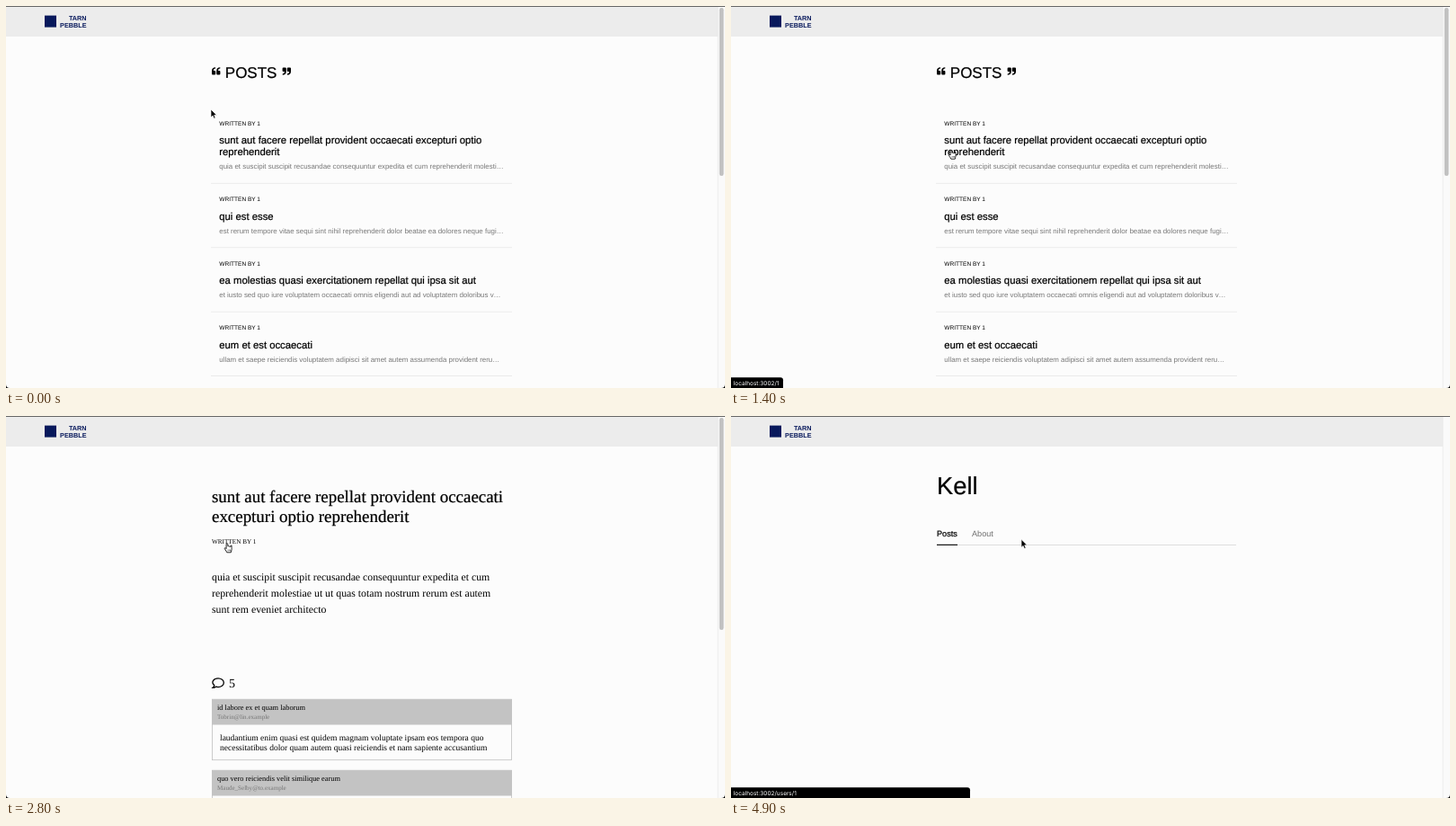
An HTML page for the animation above (5 s loop, 800x425 px).

```html
<!DOCTYPE html>
<html lang="en">
<head>
<meta charset="utf-8">
<title>Posts</title>
<style>
html, body { margin: 0; width: 100%; height: 100%; overflow: hidden; background: #fcfcfc; }
svg { display: block; width: 100%; height: 100%; }
text { text-rendering: geometricPrecision; white-space: pre; }
.sans { font-family: "Liberation Sans", Arial, sans-serif; }
.serif { font-family: "Liberation Serif", "Times New Roman", serif; }
.ui { font-family: Inter, sans-serif; }
.strong { stroke: #000; stroke-width: .22px; }
</style>
</head>
<body>
<svg id="stage" viewBox="0 0 800 425"></svg>
<script>
const text = (x, y, size, str, fill = '#000', extra = '') =>
  `<text x="${x}" y="${y}" font-size="${size}" fill="${fill}" ${extra}>${str}</text>`;
const rect = (x, y, w, h, fill, extra = '') =>
  `<rect x="${x}" y="${y}" width="${w}" height="${h}" fill="${fill}" ${extra}/>`;
const group = (id, body, cls = 'sans') => `<g id="${id}" class="${cls}">${body}</g>`;
const strong = 'class="strong"';

// Brand block, 112 x 27 units
const brand = (x, y, scale) => `<g class="sans" font-weight="700" text-anchor="end"
  transform="translate(${x} ${y}) scale(${scale})">
  ${rect(19, 0, 26, 26, '#08195c')}
  ${text(112, 11.6, 14.5, 'TARN', '#08195c')}${text(112, 26, 14.5, 'PEBBLE', '#08195c')}</g>`;

const byline = (id, x, y, size, width) => `<g id="${id}">
  ${text(x, y, size, 'WRITTEN BY 1')}
  ${rect(x, y + .7, width, .6, '#777', 'class="line"')}</g>`;

const quote = (x, y, turn) => {
  const drop = 'M4.1 .2V1.6C2.4 1.8 1.9 2.7 1.9 4H3.2Q4.2 4 4.2 5V7.6Q4.2 8.6 3.2 8.6H1Q0 8.6 0 7.6V4.2C0 1.8 1.5 .2 4.1 .2Z';
  return `<g transform="translate(${x} ${y}) rotate(${turn})">
    <path d="${drop}"/><path d="${drop}" transform="translate(5.2 0)"/></g>`;
};

const post = (y, titles, excerpt, id) => {
  const last = y + 20.3 + (titles.length - 1) * 13.3;
  return byline(id, 237.3, y, 6.55, 45.5) +
    titles.map((s, i) => text(237.3, y + 20.3 + i * 13.3, 11.3, s, '#000', strong)).join('') +
    text(237.3, last + 15, 7.9, excerpt, '#777') +
    rect(228, last + 30.7, 335, .8, '#e8e8e8');
};

const icons = [
  '<circle cx="4" cy="2.6" r="2"/><path d="M.6 8C.6 4.4 7.4 4.4 7.4 8Z"/>',
  '<rect x=".5" y="1.2" width="7.4" height="5.8" rx=".8"/><path d="M.6 2.4L4.2 5 7.8 2.4"/>',
  '<path d="M5.5.8L7.6 1.3C7.6 5 5 7.7 1.1 7.8L.6 5.8 2.5 5 3.4 6C4.5 5.5 5.2 4.7 5.8 3.6L4.9 2.7Z"/>',
  '<circle cx="4.1" cy="4.1" r="3.6"/><ellipse cx="4.1" cy="4.1" rx="1.7" ry="3.6"/><path d="M.5 4.1H7.7M1 2.3H7.2M1 5.9H7.2"/>'
];
const contact = ['Odette Varlow', 'Honest@vu.example', '1-202-555-0143 x31907', 'marvo.example'];

const popup = (id, x, y, cls, size) => `<g id="${id}" class="${cls}" transform="translate(${x} ${y})">
  ${rect(0, 0, 122, 99, '#ececec', 'stroke="#d2d2d2" stroke-width=".8" filter="url(#soft)"')}
  <path d="M.5 41.5L-11 50 .5 58.5Z" fill="#ececec"/>
  ${text(11, 19, 11.3, 'Kell', '#000', strong)}
  ${contact.map((s, i) => text(22.4, 41.3 + i * 14.5, size, s, '#707070') +
    `<g transform="translate(11 ${35 + i * 14.5})" fill="none" stroke="#222" stroke-width=".9">${icons[i]}</g>`).join('')}</g>`;

const comment = (y, title, mail, lines) =>
  rect(229.4, y, 333.2, 67.5, '#fcfcfc', 'stroke="#c0c0c0" stroke-width=".8"') +
  rect(229, y, 334, 28.3, '#c3c3c3') +
  text(235, y + 12.2, 8.35, title) + text(235, y + 21.8, 7.05, mail, '#777') +
  lines.map((s, i) => text(238, y + 45.5 + i * 11.2, 9.5, s)).join('');

const list = group('list',
  quote(229, 68, 0) + quote(317, 77, 180) + text(243.8, 80, 17, 'POSTS', '#000', strong) +
  post(132.6, ['sunt aut facere repellat provident occaecati excepturi optio', 'reprehenderit'],
    'quia et suscipit suscipit recusandae consequuntur expedita et cum reprehenderit molesti…', 'listBy') +
  post(217.4, ['qui est esse'],
    'est rerum tempore vitae sequi sint nihil reprehenderit dolor beatae ea dolores neque fugi…', 'by2') +
  post(288.8, ['ea molestias quasi exercitationem repellat qui ipsa sit aut'],
    'et iusto sed quo iure voluptatem occaecati omnis eligendi aut ad voluptatem doloribus v…', 'by3') +
  post(360.2, ['eum et est occaecati'],
    'ullam et saepe reiciendis voluptatem adipisci sit amet autem assumenda provident reru…', 'by4') +
  popup('listPop', 299, 79.5, 'sans', 7.9));

const article = group('article',
  ['sunt aut facere repellat provident occaecati', 'excepturi optio reprehenderit']
    .map((s, i) => text(229, 96 + i * 22, 18.93, s, '#000', strong)).join('') +
  byline('articleBy', 229, 141.6, 7.2, 49.6) +
  ['quia et suscipit suscipit recusandae consequuntur expedita et cum',
   'reprehenderit molestiae ut ut quas totam nostrum rerum est autem',
   'sunt rem eveniet architecto'].map((s, i) => text(229, 183.4 + i * 17.8, 11.8, s)).join('') +
  `<path d="M230.2 302.3Q231.8 301 231.8 299.6C227.6 295.8 231.3 291.8 236 291.8C239.6 291.8 242.3 294 242.3 296.7
    C242.3 299.6 239.3 301.6 236 301.6Q234.7 301.6 233.5 301.2Q232.2 302.3 230.2 302.3Z" fill="none" stroke="#000" stroke-width="1.3"/>` +
  text(248, 302, 14, '5') +
  comment(315.2, 'id labore ex et quam laborum', 'Tobrin@lin.example',
    ['laudantium enim quasi est quidem magnam voluptate ipsam eos tempora quo',
     'necessitatibus dolor quam autem quasi reiciendis et nam sapiente accusantium']) +
  comment(394.2, 'quo vero reiciendis velit similique earum', 'Maude_Selby@to.example', []) +
  popup('articlePop', 290.7, 89.5, 'serif', 8.1), 'serif');

const profile = group('profile',
  text(229, 87, 27.3, 'Kell', '#000', strong) +
  text(229, 134, 9.15, 'Posts', '#000', 'class="strong"') + text(268, 134, 9.15, 'About', '#707070') +
  rect(229, 143, 333, .8, '#d8d8d8') + rect(229, 142.8, 23, 1.1, '#000'));

document.getElementById('stage').innerHTML = `
  <defs><filter id="soft" x="-10%" y="-10%" width="120%" height="125%">
    <feDropShadow dx="0" dy="1" stdDeviation="1.5" flood-opacity=".14"/></filter></defs>
  ${rect(0, 0, 800, 425, '#fcfcfc')}
  ${list}${article}${profile}
  ${group('loader', brand(340, 215.3, 1))}
  ${rect(0, 0, 792, 34, '#ececec')}${brand(33.5, 10.6, .5)}
  ${rect(792, 0, 8, 425, '#fafafa')}${rect(791.7, 0, .7, 425, '#e5e5e5')}
  ${rect(793.8, 2, 4.7, 187, '#c1c1c1', 'rx="2.35" id="thumb"')}
  ${rect(0, 0, 800, 1, '#666')}
  <path d="M0 421Q0 425 4 425H0ZM800 421Q800 425 796 425H800Z"/>
  <g id="status" class="ui"><path id="bubble"/>${text(2.7, 421.7, 6.5, '', '#fff', 'id="url"')}</g>
  <g id="arrow"><path d="M0 0V9L2.1 7.1 3.5 10.2 5.1 9.5 3.7 6.5H6.5Z" stroke="#fff" stroke-width=".7"/></g>
  <g id="hand"><path d="M-.9 .8Q0-.4 .9 .8V3.4Q1.8 2.7 2.5 3.6 3.4 3 4 4 5-.1 5.1 4.9V7Q4.7 8.2 4.3 10.2H-.2Q-.9 8.6-2.6 6.2C-3.2 5-1.8 4.6-.9 6Z"
    fill="#fff" stroke="#000" stroke-width=".85" stroke-linejoin="round"/>
    <path d="M1 7V8.7M2.3 7V8.7M3.5 7V8.7" stroke="#000" stroke-width=".5"/></g>`;

const el = id => document.getElementById(id);
const show = (id, on) => { el(id).style.display = on ? '' : 'none'; };
const clamp = v => Math.max(0, Math.min(1, v));
const latest = (keys, t) => keys.filter(k => k[0] <= t).pop();

// time, x, y, hand
const pointer = [
  [0, 228, 115, 0], [100, 231, 118, 0], [200, 237, 124, 0], [300, 243.5, 130, 1],
  [1200, 244.3, 148.6, 1], [1300, 245, 157, 1], [1400, 245, 160, 1], [1900, 245, 160, 0],
  [2800, 246, 141.6, 1], [2900, 246, 139.5, 1], [3000, 246, 138.4, 1],
  [4300, 266, 137.6, 1], [4400, 296, 137.6, 1], [4500, 323, 137.6, 1], [4700, 323, 137.3, 0]
];
const scenes = [[0, 'list'], [1900, 'loader'], [2200, 'article'], [4700, 'loader'], [4900, 'profile']];
// time, bubble width, path
const links = [[0, 78, 'users/1'], [1300, 58, '1'], [1900, 266, '1'], [2800, 78, 'users/1'], [4700, 266, 'users/1']];

const hover = (by, pop, on, strength) => {
  el(by).firstElementChild.setAttribute('fill', on ? '#777' : '#000');
  el(by).querySelector('.line').style.display = on ? '' : 'none';
  el(pop).style.opacity = on ? strength : 0;
};

const statusAlpha = t =>
  t < 1900 ? clamp((t - 600) / 400) :
  t < 2800 ? clamp((2400 - t) / 250) :
  clamp((t - 2900) / 400);

function update(time) {
  const t = Math.floor(time % 5000 / 100) * 100;
  const [start, scene] = latest(scenes, t);
  for (const id of ['list', 'article', 'profile', 'loader']) show(id, id === scene);
  el('loader').style.opacity = clamp(.3 + (t - start) * .0027);

  show('thumb', scene === 'list' || scene === 'article');
  el('thumb').setAttribute('height', scene === 'list' ? 187 : 236);

  hover('listBy', 'listPop', t >= 400 && t < 1300, clamp((t - 300) / 200));
  hover('articleBy', 'articlePop', t >= 2900, clamp((t - 2800) / 200));

  const [, width, path] = latest(links, t);
  el('bubble').setAttribute('d', `M0 413.3H${width - 3}Q${width} 413.3 ${width} 416.3V425H0Z`);
  el('url').textContent = 'localhost:3002/' + path;
  el('status').style.opacity = statusAlpha(t);

  const [, x, y, hand] = latest(pointer, t);
  show('hand', hand);
  show('arrow', !hand);
  el(hand ? 'hand' : 'arrow').setAttribute('transform', `translate(${x} ${y})`);
}

for (const id of ['by2', 'by3', 'by4']) el(id).querySelector('.line').style.display = 'none';
const origin = performance.now();
function tick() {
  update(performance.now() - origin);
  requestAnimationFrame(tick);
}
tick();
</script>
</body>
</html>
```
